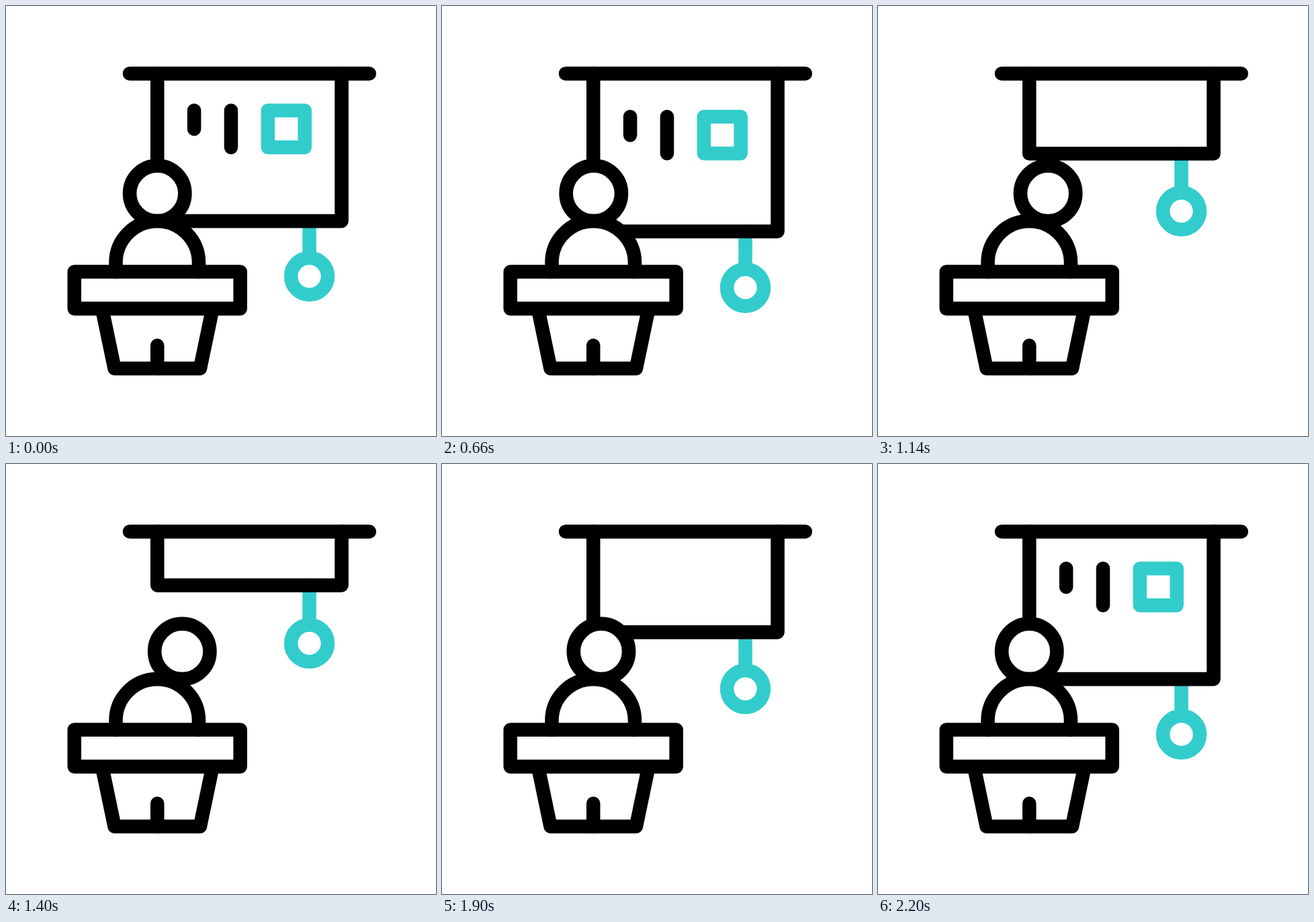
These frames come from a looping animation (640 by 640 pixels, 2.4 s). An HTML page with a canvas:

```html
<!DOCTYPE html>
<html lang="en">
<head>
<meta charset="utf-8">
<title>Speaker at a lectern</title>
<style>
  html, body { margin: 0; width: 100%; height: 100%; overflow: hidden; background: #fff; }
  canvas { display: block; width: 100vw; height: 100vh; }
</style>
</head>
<body>
<canvas id="stage" width="640" height="640"></canvas>
<script>
const ctx = document.getElementById('stage').getContext('2d');
const LOOP = 2400, STEP = 20;
const UNIT = 1.3717, OX = 225.2, OY = 320.1;
const BLACK = '#000', TEAL = '#33cccc', WHITE = '#fff';

// grid units to pixels, measured from the screen's lower left corner
const X = k => OX + k * UNIT;
const Y = k => OY + k * UNIT;

const smooth = s => s * s * (3 - 2 * s);

// keys: [time, value] pairs, eased in and out between neighbours
function track(keys, t) {
  if (t <= keys[0][0]) return keys[0][1];
  for (let i = 1; i < keys.length; i++) {
    const [t0, a] = keys[i - 1], [t1, b] = keys[i];
    if (t <= t1) return a + (b - a) * smooth((t - t0) / (t1 - t0));
  }
  return keys[keys.length - 1][1];
}

const rollTrack = (down, up) =>
  [[400, 0], [600, down], [1400, up], [1600, up], [2200, 0]];

const SCREEN = rollTrack(18, -139.5);
const RING = rollTrack(19.3, -135.5);
const CHART = rollTrack(12.9, -219.3);
const HEAD = [[600, 0], [1400, 37.05], [2200, 0]];

function paint(color, fill) {
  if (fill) {
    ctx.fillStyle = fill;
    ctx.fill();
  }
  ctx.strokeStyle = color;
  ctx.stroke();
}

function poly(points, { color = BLACK, fill, close, dy = 0 } = {}) {
  ctx.beginPath();
  for (const [x, y] of points) ctx.lineTo(X(x), Y(y) + dy);
  if (close) ctx.closePath();
  paint(color, fill);
}

function ring(x, y, r, color) {
  ctx.beginPath();
  ctx.arc(x, y, r * UNIT, 0, Math.PI * 2);
  paint(color, WHITE);
}

function drawChart(dy) {
  ctx.save();
  ctx.beginPath();
  ctx.rect(0, Y(-160), 640, 640);
  ctx.clip();
  poly([[40, -120], [40, -100]], { dy });
  poly([[80, -120], [80, -80]], { dy });
  poly([[120, -120], [160, -120], [160, -80], [120, -80]], { color: TEAL, close: true, dy });
  ctx.restore();
}

function drawScreen(t) {
  const drop = track(SCREEN, t) / UNIT;
  const ringY = Y(60) + track(RING, t);
  ctx.beginPath();
  ctx.moveTo(X(165), Y(drop));
  ctx.lineTo(X(165), ringY - 20 * UNIT);
  paint(TEAL);
  ring(X(165), ringY, 20, TEAL);
  drawChart(track(CHART, t));
  poly([[0, -160], [0, drop], [200, drop], [200, -160]]);
  poly([[-30, -160], [230, -160]]);
}

function drawSpeaker(t) {
  ring(X(0) + track(HEAD, t), Y(-30), 30, BLACK);
  ctx.beginPath();
  ctx.moveTo(X(-45), Y(55));
  ctx.arc(X(0), Y(45), 45 * UNIT, Math.PI, 0);
  ctx.lineTo(X(45), Y(55));
  paint(BLACK, WHITE);
}

function drawLectern() {
  poly([[-60, 95], [-46.4, 160], [46.4, 160], [60, 95]]);
  poly([[0, 135], [0, 160]]);
  poly([[-90, 55], [90, 55], [90, 95], [-90, 95]], { close: true });
}

function draw(t) {
  ctx.fillStyle = WHITE;
  ctx.fillRect(0, 0, 640, 640);
  ctx.lineWidth = 15 * UNIT;
  ctx.lineCap = ctx.lineJoin = 'round';
  drawScreen(t);
  drawSpeaker(t);
  drawLectern();
}

const start = performance.now();
function tick() {
  const t = (performance.now() - start) % LOOP;
  draw(Math.floor(t / STEP) * STEP);
  requestAnimationFrame(tick);
}
tick();
</script>
</body>
</html>
```
